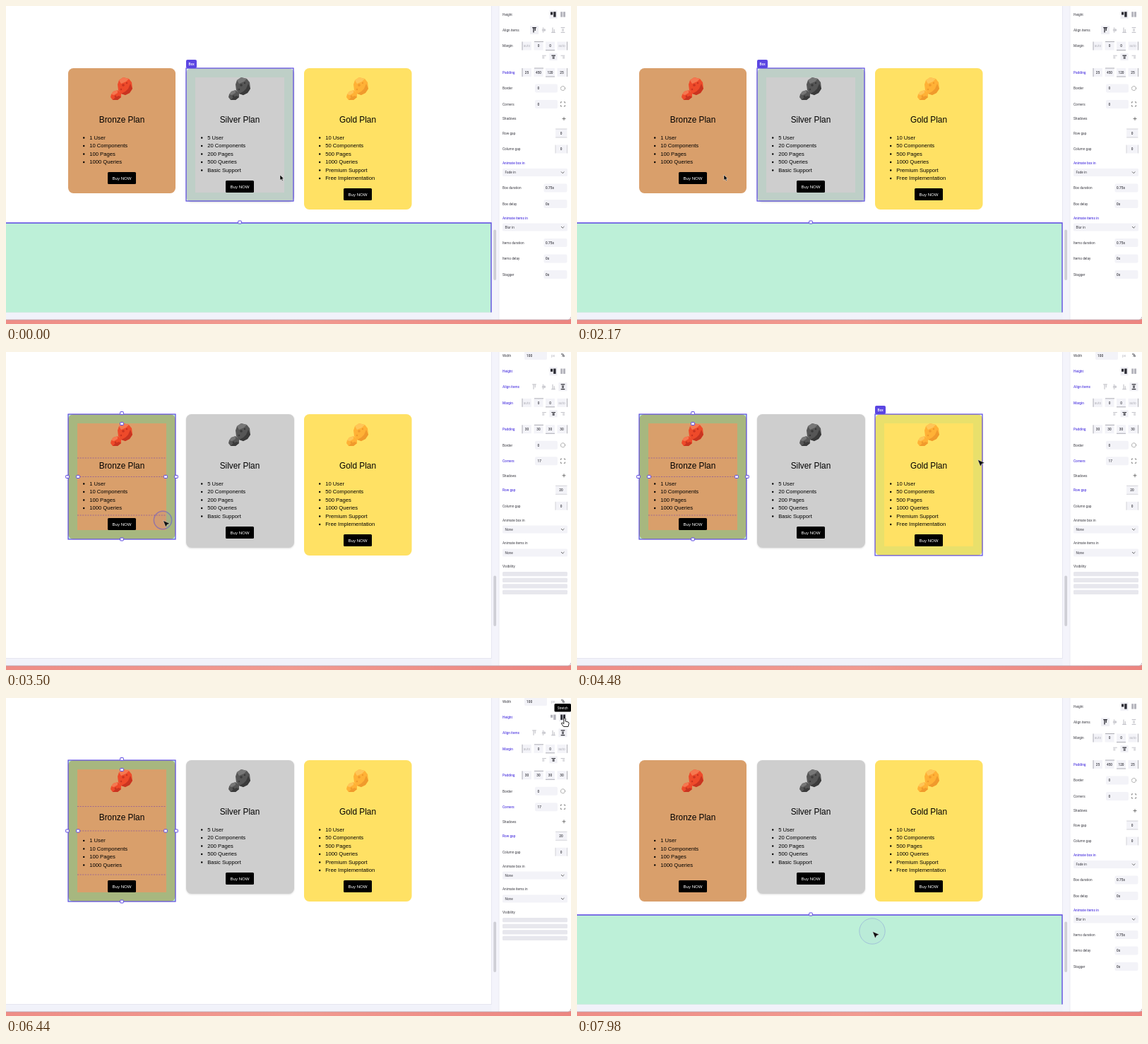
Recreate the animation shown at these times as an HTML page. Size 800 by 450 pixels, loop 8 s.

```html
<!DOCTYPE html>
<html lang="en">
<head>
<meta charset="utf-8">
<title>Pricing plans editor</title>
<style>
  html, body { margin: 0; width: 100%; height: 100%; overflow: hidden; background: #fff; }
  svg { display: block; width: 100vw; height: 100vh; }
  .page { font-family: "Liberation Sans", Arial, sans-serif; }
  .panel { font-family: Roboto, sans-serif; font-size: 4.75px; fill: #3c3c44; }
</style>
</head>
<body>
<svg viewBox="0 0 800 450">
  <defs>
    <linearGradient id="salmon">
      <stop offset="0" stop-color="#ee8d86"/><stop offset=".5" stop-color="#f19a90"/><stop offset="1" stop-color="#ec8580"/>
    </linearGradient>
  </defs>
  <g id="scene"></g>
  <circle id="ring" fill="#5a50d8" fill-opacity=".1" stroke="#5a50d8"/>
  <g id="cursor"></g>
</svg>
<script>
const LOOP = 8000, SELECT = 3360, STRETCH = 5900, DESELECT = 7770;
const PURPLE = '#5b46e2', FIELD = '#f3f3f8', MUTED = '#b4b4bc', INK = '#2c2c34';
const $ = id => document.getElementById(id);

const rect = (x, y, w, h, fill, extra = '') =>
  `<rect x="${x}" y="${y}" width="${w}" height="${h}" fill="${fill}" ${extra}/>`;
const text = (x, y, s, extra = '') => `<text x="${x}" y="${y}" ${extra}>${s}</text>`;
const centred = (x, y, s, extra = '') => text(x, y, s, 'text-anchor="middle" ' + extra);
const line = (d, color, width = .7, extra = '') =>
  `<path d="${d}" fill="none" stroke="${color}" stroke-width="${width}" ${extra}/>`;
const outline = (x, y, w, h) => rect(x, y, w, h, 'none', `stroke="${PURPLE}" stroke-width="1.2"`);
const handle = (x, y) => rect(x - 2.3, y - 2, 4.6, 4, '#fff', `stroke="${PURPLE}" rx=".6"`);

// ---- Pricing cards ----
const cards = [
  { name: 'Bronze', x: 88, w: 152, h: 177, fill: '#d99f6b', rock: ['#ee4a2a', '#f57850', '#c93420'],
    items: ['1 User', '10 Components', '100 Pages', '1000 Queries'] },
  { name: 'Silver', x: 255, w: 153, h: 189, fill: '#cecece', rock: ['#565656', '#777', '#3a3a3a'],
    items: ['5 User', '20 Components', '200 Pages', '500 Queries', 'Basic Support'] },
  { name: 'Gold', x: 422, w: 152.5, h: 200, fill: '#ffe164', rock: ['#ffb136', '#ffc658', '#f09a2c'],
    items: ['10 User', '50 Components', '500 Pages', '1000 Queries', 'Premium Support', 'Free Implementation'] }
];

function rocks(cx, [base, light, dark]) {
  return `<g transform="translate(${cx} 117)">
    <path d="M-4-12 2-16 10-14 14-9 15 0 11 6 5 9-1 7-5 2-6-6Z" fill="${base}"/>
    <path d="M-4-12 2-16 10-14 6-10-1-7Z" fill="${light}"/>
    <path d="M15 0 11 6 5 9-1 7 5 4 9 0 12-7Z" fill="${dark}"/>
    <path d="M-15 8-12 4-6 2-1 6-1 12-6 16-13 16-16 12Z" fill="${base}"/>
    <path d="M-15 8-12 4-6 2-6 6-11 9Z" fill="${light}"/>
    <path d="M-1 12-6 16-13 16-9 12-4 10Z" fill="${dark}"/>
    <g fill="${dark}"><circle cx="2" cy="-5" r="1.8"/><circle cx="7" cy="-8" r="1.2"/>
    <circle cx="-1" cy="1" r="1.2"/><circle cx="-9" cy="11" r="1.4"/></g></g>`;
}

function card(c, grow) {
  const cx = c.x + 76, listY = 188.9 + grow * 15.4, buttonY = 88 + c.h + grow * 23 - 30;
  const items = c.items.map((s, i) => {
    const y = listY + i * 11.5;
    return `<circle cx="${c.x + 22.2}" cy="${y - 2.4}" r="1.2"/>` + text(c.x + 30.2, y, s);
  }).join('');
  const shadow = c.name === 'Silver' ? 'style="filter:drop-shadow(0 1px 1px #0002)"' : '';
  return rect(c.x, 88, c.w, c.h + grow * 23, c.fill, 'rx="7.5" ' + shadow) + rocks(cx, c.rock) +
    `<g font-size="7.65">${items}</g>` +
    centred(cx, 164.8 + grow * 7.8, c.name + ' Plan', 'font-size="11.85"') +
    rect(cx - 20, buttonY, 40, 17, '#000', 'rx="1.5"') +
    centred(cx, buttonY + 10.6, 'Buy NOW', 'font-size="6.1" fill="#fff"');
}

function padding(c, h, opacity) {
  const r = c.x + 152, b = 88 + h;
  return `<path fill-rule="evenodd" fill="rgb(90 218 158)" fill-opacity="${opacity}"
    d="M${c.x} 88H${r}V${b}H${c.x}ZM${c.x + 13} 101V${b - 13}H${r - 13}V101Z"/>`;
}

function hoverBox(c) {
  return padding(c, c.h, .13) + outline(c.x, 88, 152, c.h - (c.h === 189 ? 1 : 0)) +
    rect(c.x, 76, 15, 12, PURPLE, 'rx="2"') +
    centred(c.x + 7.5, 83.6, 'Box', 'font-size="4.8" fill="#fff" font-family="Roboto, sans-serif" font-weight="500"');
}

function selectedBox(c, grow) {
  const h = c.h + grow * 23, mid = grow ? 188 : 176.5, bottom = 88 + h;
  const dashes = (grow ? [153.5, 188, 250] : [150, 176.5, 231]).map(y => `M101 ${y}H227`).join('');
  return padding(c, h, .4) + line(dashes, '#8f5b9a', .8, 'stroke-dasharray="2 1.6"') + outline(88, 88, 152, h) +
    [[164, 86.5], [164, 101.5], [87, mid], [102, mid], [226, mid], [241, mid], [164, bottom]]
      .map(p => handle(...p)).join('');
}

const selectedSection = () =>
  rect(0, 307, 687, 126.5, '#bdf0d8') + line('M0 307H687V433.5', PURPLE, 1.3) + handle(331, 306);

// ---- Settings panel ----
const label = (y, s, changed) =>
  text(703, y + 1.7, s, changed ? `fill="${PURPLE}" font-weight="500"` : '');
const field = (x, y, w, value, tx = x + 3.5) =>
  rect(x, y - 6, w, 12, FIELD, 'rx="2"') + text(tx, y + 1.8, value, 'font-weight="500"');

function select(y, value) {
  return rect(703, y - 5.5, 92, 11, FIELD, 'rx="1.5"') + text(706.5, y + 1.7, value) +
    line(`M786 ${y - 1}l2.2 2.2 2.2-2.2`, '#555', .9);
}

function sides(y, values) {
  const edges = [`M731 ${y - 6}v12`, `M748 ${y - 6}h13`, `M764 ${y + 6}h13`, `M794.5 ${y - 6}v12`];
  return values.map((v, i) => {
    const x = 737.5 + i * 16.5;
    return rect(x - 6.5, y - 6, 13, 12, FIELD) + line(edges[i], '#8c8c96') +
      centred(x, y + 1.8, v, v === 'auto' ? `fill="${MUTED}"` : 'font-weight="500"');
  }).join('');
}

function heightIcons(y, stretched) {
  const [auto, full] = stretched ? [MUTED, INK] : [INK, MUTED];
  return rect(stretched ? 783 : 769.5, y - 6, 11, 12, '#f0f0f5') +
    rect(771, y - 3.5, 3.2, 4, auto) + rect(775.2, y - 3.8, 3.4, 7.4, auto) +
    rect(785.2, y - 3.8, 3, 7.4, full) + rect(789, y - 3.8, 3, 7.4, full);
}

function alignIcons(y, active) {
  const shapes = [`M-2.8-3.4H2.8M-1-3V3.5M1.2-3V1`, `M-2.8 0H2.8M-1-3.5V3.5M1.2-2V2`,
    `M-2.8 3.4H2.8M-1 3V-3.5M1.2 3V-1`, `M-2.8-3.4H2.8M-2.8 3.4H2.8M-1.5-1H1.5M-1.5 1H1.5`];
  return shapes.map((d, i) => (i === active ? rect(742 + i * 13.5, y - 6, 12, 12, '#f0f0f5') : '') +
    line(d, i === active ? INK : MUTED, i === active ? 1.3 : .9,
      `transform="translate(${748 + i * 13.5} ${y})"`)).join('');
}

function justifyIcons(y) {
  return rect(769.5, y - 5, 11, 10, '#f0f0f5') + [-1.2, 0, 1.2].map((shift, i) => {
    const x = 762 + i * 13.2;
    return line(`M${x - 2.8} ${y - 1.8}h5.6M${x - 1.5 + shift} ${y}h3M${x - 1.5 + shift} ${y + 1.8}h3`,
      i === 1 ? INK : MUTED, i === 1 ? 1.2 : .8);
  }).join('');
}

function layoutRows(dy, box, stretched) {
  const y = v => v + dy;
  return label(y(12), 'Height', box) + heightIcons(y(12), stretched) +
    label(y(34), 'Align items', box) + alignIcons(y(34), box ? 3 : 0) +
    label(y(56.5), 'Margin', box) + sides(y(56.5), ['auto', 0, 0, 'auto']) + justifyIcons(y(72)) +
    label(y(94), 'Padding', true) + sides(y(94), box ? [30, 30, 30, 30] : [25, 450, 120, 25]) +
    label(y(116.5), 'Border') + field(749, y(116.5), 32, 0) +
    `<circle cx="788.5" cy="${y(116.5)}" r="3" fill="none" stroke="#555" stroke-width=".7" stroke-dasharray="1.6 .8"/>` +
    label(y(139), 'Corners', box) + field(749, y(139), 32, box ? 17 : 0) +
    line(`M785.5 ${y(137.5)}v-1.7h1.7m2.6 0h1.7v1.7m0 2.8v1.7h-1.7m-2.6 0h-1.7v-1.7`, '#555') +
    label(y(159.5), 'Shadows') + line(`M787.5 ${y(159.5)}h5m-2.5-2.5v5`, '#444') +
    label(y(180), 'Row gap', box) + field(778, y(180), 16.5, box ? 20 : 0, box ? 783.3 : 784.7) +
    line(`M778 ${y(174)}h16.5m0 12h-16.5`, '#b9b9c2', .6) +
    label(y(202.5), 'Column gap') + field(778, y(202.5), 16.5, 0, 784.7) +
    line(`M778 ${y(196.5)}v12m16.5 0v-12`, '#b9b9c2', .6);
}

function sectionPanel() {
  const timing = [[257.5, 'Box duration', '0.75s'], [280, 'Box delay', '0s'],
    [335, 'Items duration', '0.75s'], [357.5, 'Items delay', '0s'], [380, 'Stagger', '0s']];
  return layoutRows(0, false, false) +
    label(222.5, 'Animate box in', true) + select(235.5, 'Fade in') +
    label(300, 'Animate items in', true) + select(313, 'Blur in') +
    timing.map(([y, name, value]) => label(y, name) + field(761.5, y, 33, value, 764)).join('');
}

function boxPanel(stretched) {
  return label(5, 'Width') + field(734, 5, 32, 100, 737) + centred(774.5, 6.7, 'px', `fill="${MUTED}"`) +
    centred(788.5, 7.4, '%', 'font-weight="700" font-size="6.8"') + layoutRows(15.3, true, stretched) +
    label(238, 'Animate box in') + select(251, 'None') +
    label(270.5, 'Animate items in') + select(284, 'None') + label(303, 'Visibility') +
    [311, 319.7, 328.2, 336.7].map(y => rect(703, y, 92, 6.2, '#e7e7ed', 'rx="1.5"')).join('');
}

const frame = () =>
  rect(0, 0, 800, 450, '#fff') + rect(0, 443, 800, 7, 'url(#salmon)') +
  `<path d="M0 0H800V440Q800 444 796 444H0Z" fill="#fff"/>` +
  rect(0, 433.5, 698, 10.5, '#f1f2fa') + rect(687.5, 0, 10.5, 444, '#f4f4fb') +
  line('M687.5 0V433.5H0', '#e2e2ee', .8) + line('M698 0V444', '#e8e8f0', .8) +
  line('M0 444H796Q799.6 444 799.6 440', '#b9a3ae', .8) +
  rect(690.3, 316.5, 3.8, 71.5, '#cfcfd6', 'rx="1.9"');

function drawScene({ boxSelected, stretched, hover, tip }) {
  const grow = stretched ? 1 : 0;
  $('scene').innerHTML = frame() + '<g class="page">' + (boxSelected ? '' : selectedSection()) +
    cards.map((c, i) => card(c, i ? 0 : grow)).join('') + '</g>' +
    (boxSelected ? selectedBox(cards[0], grow) : '') + (hover < 0 ? '' : hoverBox(cards[hover])) +
    '<g class="panel">' + (boxSelected ? boxPanel(stretched) : sectionPanel()) +
    (tip ? rect(776.5, 8, 23.5, 11.5, '#000', 'rx="1.5"') + centred(788.2, 15.5, 'Stretch', 'fill="#fff"') : '') + '</g>';
}

// ---- Pointer ----
const path = [[0, 388, 239], [1400, 388, 239], [2170, 208, 239], [2700, 208, 239], [3300, 223, 239],
  [3650, 223, 239], [4480, 568, 153], [4800, 580, 148], [5600, 791, 28], [6500, 791, 28],
  [7050, 446, 306], [7450, 446, 306], [7750, 419, 331], [LOOP, 419, 331]];

const pointers = {
  arrow: '<path d="M0 0V7.5L1.8 6 3 8.6 4.3 8 3.1 5.6H5.4Z" fill="#000" stroke="#fff" stroke-width=".5"/>',
  wide: '<path d="M-.5-.5 9 3.8 5.2 5.3 3.3 9Z" fill="#111" stroke="#fff" stroke-width=".4"/>',
  hand: `<path d="M-1.2 1Q0-.6 1.2 1V5L5 6Q6.4 6.5 6 8.5L5 12.5H-1.5L-4.6 8.2Q-4.6 6.6-2.8 7.3L-1.2 8.5Z"
    fill="#fff" stroke="#222" stroke-width="1"/>`
};

function pointerAt(t) {
  const i = Math.max(1, path.findIndex(p => p[0] >= t));
  const [t0, x0, y0] = path[i - 1], [t1, x1, y1] = path[i];
  const u = (t - t0) / (t1 - t0), e = u * u * (3 - 2 * u);
  return [x0 + (x1 - x0) * e, y0 + (y1 - y0) * e];
}

// The hover outline trails the pointer a little.
function hoveredCard(t, boxSelected) {
  const [x, y] = pointerAt(Math.max(0, t - 300));
  const i = cards.findIndex(c => x >= c.x && x <= c.x + c.w && y >= 88 && y <= 88 + c.h);
  return i === 0 && boxSelected ? -1 : i;
}

let sceneKey = '', pointerKind = '';
function render(now) {
  const t = now % LOOP, [x, y] = pointerAt(t);
  const boxSelected = t >= SELECT && t < DESELECT;
  const state = { boxSelected, stretched: t >= STRETCH, hover: hoveredCard(t, boxSelected), tip: t > 5600 && t < 6540 };
  const key = JSON.stringify(state);
  if (key !== sceneKey) { drawScene(state); sceneKey = key; }

  const kind = t < 2700 ? 'arrow' : x > 782 && y < 45 ? 'hand' : 'wide';
  if (kind !== pointerKind) { $('cursor').innerHTML = pointers[kind]; pointerKind = kind; }
  $('cursor').setAttribute('transform', `translate(${x} ${y})`);

  const click = [SELECT, STRETCH, DESELECT].find(c => t >= c && t < c + 300);
  const age = click === undefined ? 300 : t - click, ring = $('ring');
  ring.setAttribute('cx', x - 1);
  ring.setAttribute('cy', y - 1);
  ring.setAttribute('r', 1.5 + age * .079);
  ring.setAttribute('stroke-width', 2.6 * (1 - age / 330));
  ring.setAttribute('opacity', 1 - age / 300);
  requestAnimationFrame(render);
}
render(0);
</script>
</body>
</html>
```
